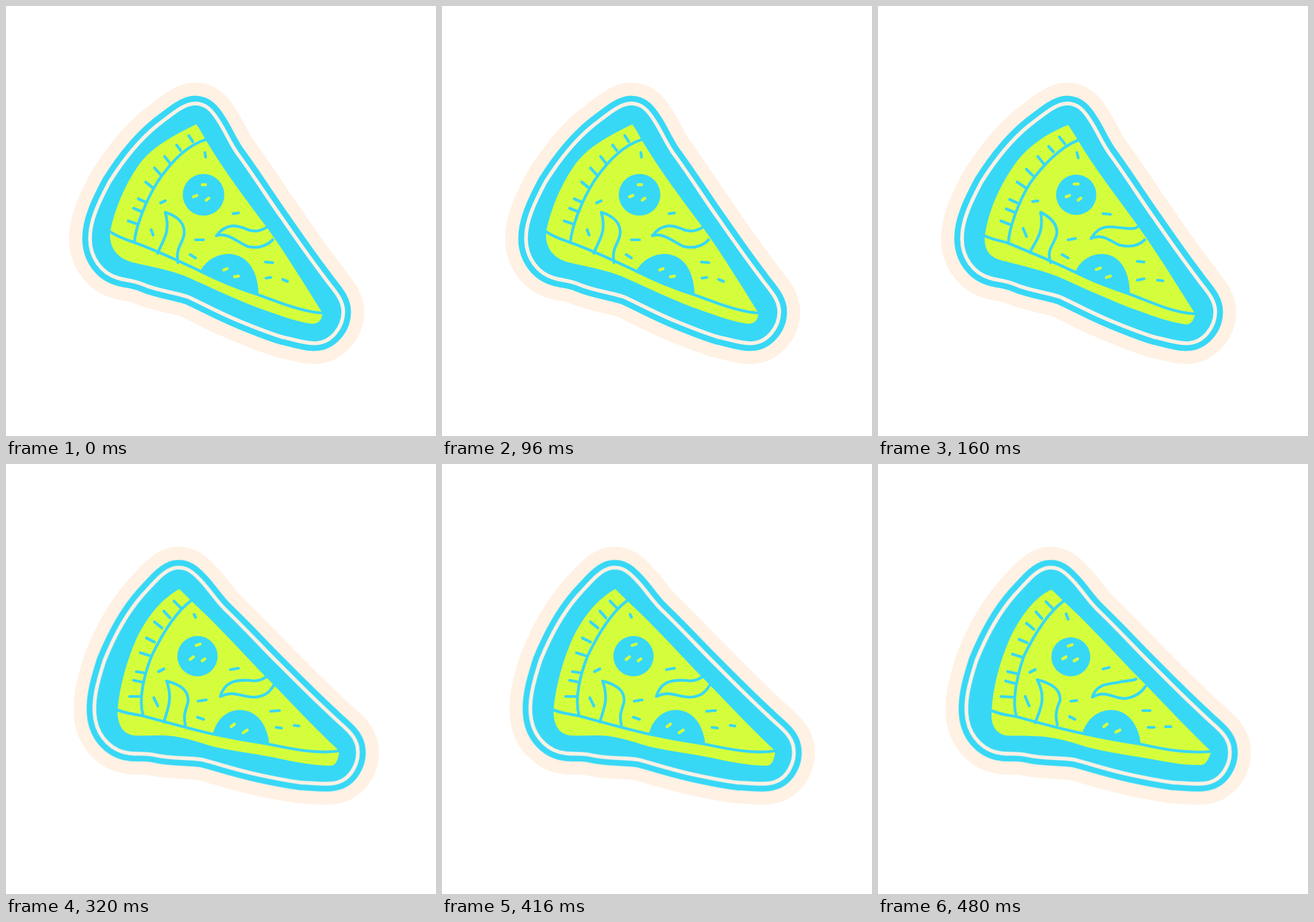
Recreate the animation shown at these times as an HTML page without scripts. Size 640x640 px, loop 0.64 s.

```html
<!DOCTYPE html>
<html lang="en">
<head>
<meta charset="utf-8">
<title>Pizza sticker</title>
<style>
  :root { --sky: #37d8f6; --lime: #d4fe3b; --cream: #fff1e3; }
  html, body { margin: 0; width: 100%; height: 100%; overflow: hidden; background: #fff; }
  svg { display: block; width: 100%; height: 100%; stroke-linecap: round; stroke-linejoin: round; }

  .badge { transform-origin: 369px 323px; animation: tilt .64s step-end infinite; }
  .rim { stroke: var(--cream); stroke-width: 62; fill: var(--cream); }
  .edge { stroke: var(--sky); stroke-width: 23; fill: var(--sky); }
  .line { stroke: var(--cream); stroke-width: 5.5; fill: none; }

  .pose { visibility: hidden; animation: show .64s step-end infinite; animation-delay: calc(var(--i) * .16s - .64s); }
  .slice { fill: var(--lime); }
  .ink { stroke: var(--sky); stroke-width: 4.2; fill: none; }
  .meat { fill: var(--sky); }
  .dots { stroke: var(--lime); stroke-width: 4.4; fill: none; }

  @keyframes tilt {
    0% { transform: none; }
    50%, 100% { transform: translate(0, -8.5px) rotate(-10.1deg); }
  }
  @keyframes show {
    0% { visibility: visible; }
    25%, 100% { visibility: hidden; }
  }
</style>
</head>
<body>
<svg viewBox="0 0 640 640">
  <defs>
    <path id="outline" d="M281 145C263 146 246 162 226 177C196 201 171 235 154 262C137 294 125 320 125 346C125 374 142 398 167 405C180 409 189 408 203 414C226 424 250 426 271 433C291 442 318 457 350 470C372 479 392 487 412 493C428 496 443 502 459 502C484 502 502 478 502 455C502 435 485 420 474 404C452 375 431 345 411 316C391 288 371 256 347 223C334 206 328 189 317 172C307 156 298 145 281 145Z"/>
  </defs>

  <g class="badge">
    <use href="#outline" class="rim"/>
    <use href="#outline" class="edge"/>
    <use href="#outline" class="line"/>
  </g>

  <g class="pose" style="--i:0">
    <path class="slice" d="M283 176Q288 182 297 199C325 246 360 292 390 332C418 371 446 417 471 457Q470 473 455 473C428 469 398 457 372 448C338 435 305 419 280 408C250 393 215 388 190 382C167 376 153 362 155 335C163 300 176 268 196 239C216 209 250 193 283 176Z"/>
    <path class="ink" d="M155 336C170 346 182 348 191 352C225 364 258 380 290 395C320 410 348 421 376 430C410 442 440 455 471 457M297 199C270 207 245 233 226 261C208 290 193 328 191 352"/>
    <path class="ink" d="M272 193l6 9M254 207l6 8M236 224l8 10M221 241l9 10M208 262l11 9M197 287l11 5M190 301l12 5M182 320l12 4"/>
    <path class="ink" d="M226 368C232 350 246 338 237 307C256 313 267 324 265 340C262 356 252 360 256 382M387 330C380 334 370 337 360 333C345 326 328 322 313 342C330 336 345 352 360 358C378 362 390 355 397 348"/>
    <path class="ink" d="M296 218l1 7M230 293l7-3M338 309l8-1M216 333l3 8M282 348l12 0M274 370l8 5M386 381l11 1M387 405l7-1M412 407l7 3"/>
    <circle class="meat" cx="294" cy="281" r="31"/>
    <path class="meat" d="M289 395C297 379 313 369 333 369C360 371 375 394 376 430Z"/>
    <path class="dots" d="M292 266l5 0M279 284l5-2M298 289l4-3M324 393l5-2M340 403l6-1"/>
  </g>

  <g class="pose" style="--i:1">
    <path class="slice" d="M283 177Q288 184 297 199C325 246 362 292 390 332C418 371 446 417 472 458Q469 474 458 474C430 470 398 457 372 448C338 434 305 420 280 408C250 394 215 387 190 380C167 376 157 364 159 341C165 304 180 270 200 241C219 211 250 190 283 177Z"/>
    <path class="ink" d="M159 342C172 349 184 349 194 353C225 366 260 380 293 396C322 411 348 420 375 429C410 442 440 457 472 458M297 200C272 210 246 236 226 264C209 292 195 330 194 353"/>
    <path class="ink" d="M270 195l8 10M254 209l7 8M238 224l8 10M221 243l9 9M207 262l12 8M196 288l11 5M191 302l12 5M183 320l13 5"/>
    <path class="ink" d="M226 367C234 350 248 338 242 307C258 315 268 325 266 340C262 356 250 362 257 382M386 329C380 333 372 331 360 330C345 328 330 325 317 346C335 338 345 350 360 356C378 360 390 355 397 348"/>
    <path class="ink" d="M296 218l2 8M230 291l8-1M335 309l11 1M216 331l5 12M283 348l11-2M274 370l9 5M386 380l10 1M386 408l10-2M416 408l8 1"/>
    <circle class="meat" cx="295" cy="281" r="30"/>
    <path class="meat" d="M293 397C300 380 315 369 334 369C358 370 374 390 375 429Z"/>
    <path class="dots" d="M292 265l6 0M280 284l5-2M298 289l4-3M325 392l6-2M340 404l6-2"/>
  </g>

  <g class="pose" style="--i:2">
    <path class="slice" d="M258 186Q264 192 276 204C312 237 344 272 378 308C418 348 456 390 496 427Q494 448 484 449C456 449 428 443 400 437C368 431 338 427 310 421C280 412 255 403 230 404C215 404 202 405 190 404C172 401 166 386 166 367C169 330 180 292 195 258C212 224 233 200 258 186Z"/>
    <path class="ink" d="M166 366C180 372 192 372 204 375C238 384 272 394 308 402C336 408 364 413 391 417C426 424 460 432 496 427M276 203C254 219 234 250 217 285C205 315 197 350 204 374"/>
    <path class="ink" d="M250 204l10 10M235 219l9 10M221 235l11 9M209 259l12 6M200 281l13 4M194 309l13 2M190 322l15 3M184 346l16 0"/>
    <path class="ink" d="M235 384C240 366 249 350 239 323C262 329 272 338 271 354C266 370 264 375 267 389M387 317C380 322 372 324 362 322C345 321 326 322 319 346C340 336 350 347 368 347C384 347 392 340 398 330"/>
    <path class="ink" d="M280 224l2 4M227 309l8-4M334 306l12-2M220 348l6 12M286 353l12-2M285 377l9 3M394 368l13-1M402 392l8 1M429 389l7 1"/>
    <circle class="meat" cx="285" cy="286" r="30"/>
    <path class="meat" d="M308 401C314 379 329 366 349 366C372 367 388 385 392 417Z"/>
    <path class="dots" d="M283 270l6-2M274 291l5-4M292 293l4-3M335 391l5-4M353 400l6-4"/>
  </g>

  <g class="pose" style="--i:3">
    <path class="slice" d="M258 187Q264 192 276 204C312 237 344 272 378 308C418 348 456 390 496 428Q490 447 481 448C456 449 428 443 400 438C368 433 338 428 310 421C280 411 255 405 230 405C215 404 202 405 190 404C174 400 168 388 169 369C171 330 182 292 197 258C213 225 234 198 258 187Z"/>
    <path class="ink" d="M169 367C182 373 194 374 206 376C238 385 272 394 304 401C336 408 364 413 391 417C426 425 460 431 496 428M276 204C255 220 234 251 217 286C207 316 199 352 206 376"/>
    <path class="ink" d="M250 205l10 10M235 220l9 10M221 237l11 9M210 261l12 5M200 283l13 4M193 309l14 3M190 323l15 4M183 346l17 1"/>
    <path class="ink" d="M234 385C240 368 252 350 237 321C260 327 272 336 271 352C264 368 264 376 267 388M384 320C378 323 372 322 362 324C350 328 326 324 319 347C340 335 350 350 368 349C384 347 392 340 398 331"/>
    <path class="ink" d="M280 223l3 8M226 310l8-4M335 305l9-2M219 346l6 14M287 353l9-1M285 376l8 4M394 367l11 0M402 392l9 0M428 391l8 0"/>
    <circle class="meat" cx="287" cy="287" r="29"/>
    <path class="meat" d="M304 400C312 378 328 366 348 366C372 367 388 388 391 417Z"/>
    <path class="dots" d="M283 271l6-2M275 290l5-3M292 293l5-3M336 391l5-4M354 399l6-3"/>
  </g>
</svg>
</body>
</html>
```
